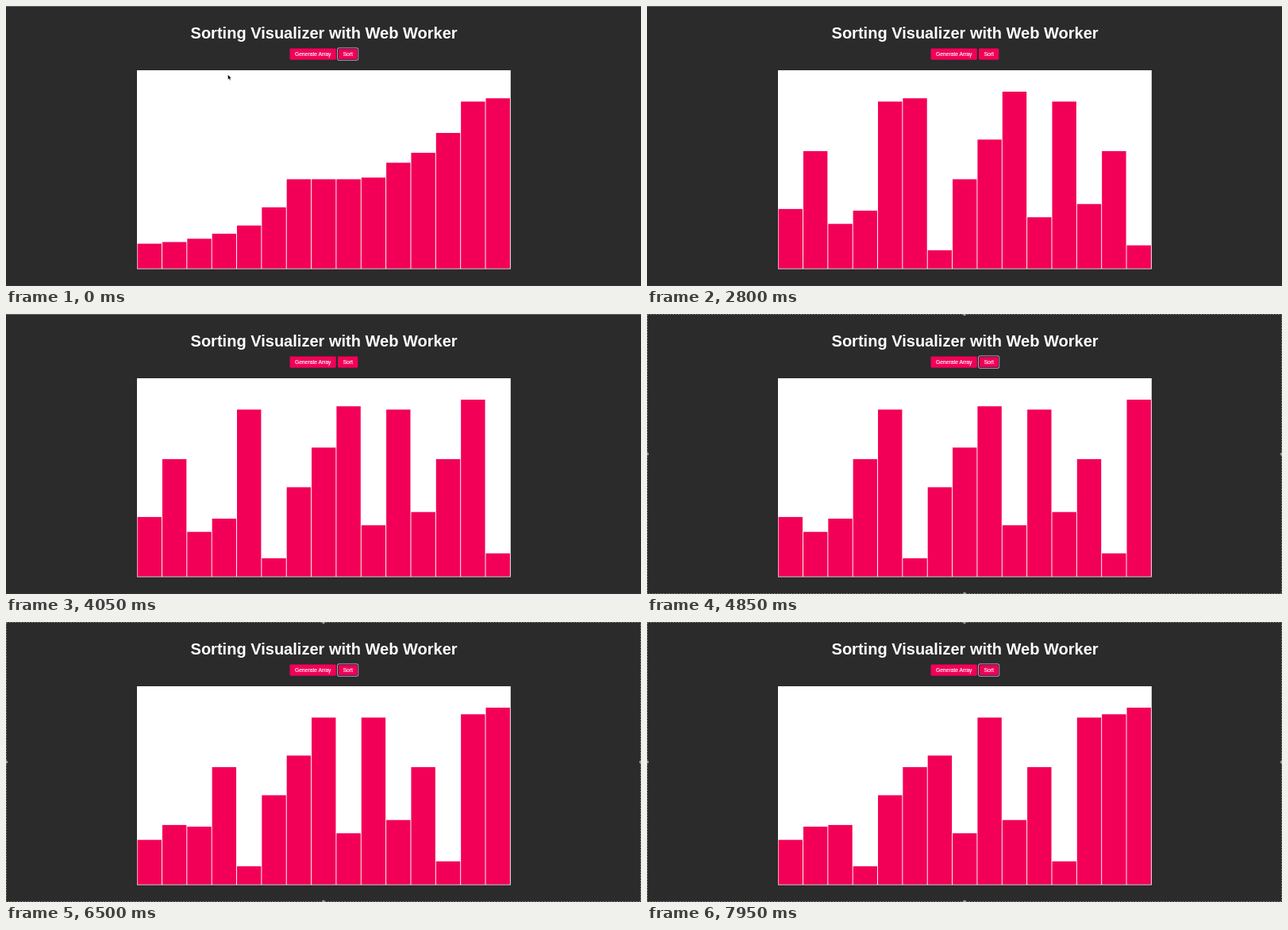
These frames come from a looping animation (800x353 px, 8000 ms). An HTML page:

```html
<!DOCTYPE html>
<html lang="en">
<head>
<meta charset="utf-8">
<title>Sorting Visualizer</title>
<style>
  html, body { margin: 0; width: 100%; height: 100%; overflow: hidden; background: #2b2b2b; }
  svg { display: block; width: 800px; height: 353px; }
  text { font-family: "Liberation Sans", Arial, sans-serif; fill: #fff; text-anchor: middle; }
  .title { font-size: 20.05px; font-weight: bold; }
  .label { font-size: 6.7px; stroke: #fff; stroke-width: 0.15; }
  .red { fill: #f20057; }
</style>
</head>
<body>
<svg viewBox="0 0 800 353">
  <rect width="800" height="353" fill="#2b2b2b"/>
  <g id="edge">
    <rect width="800" height="0.8" fill="#6c6c6c"/>
    <rect y="352.2" width="800" height="0.8" fill="#42303a"/>
  </g>
  <g id="frame" fill="none" stroke="#8c8c8c">
    <rect x="0.5" y="0.5" width="799" height="352" stroke-width="0.8" stroke-dasharray="2 1.5"/>
    <g fill="#9a9a9a" stroke="#c8c8c8" stroke-width="0.5">
      <circle cx="400" cy="0.3" r="1.6"/>
      <circle cx="400" cy="352.5" r="1.6"/>
      <circle cx="0.3" cy="176.5" r="1.6"/>
      <circle cx="799.7" cy="176.5" r="1.6"/>
    </g>
  </g>
  <text class="title" x="400.6" y="40.8">Sorting Visualizer with Web Worker</text>
  <rect class="red" x="357.5" y="53.5" width="58.3" height="14.2" rx="1.4"/>
  <text class="label" x="386.8" y="62.8">Generate Array</text>
  <rect class="red" x="418" y="53.5" width="25.3" height="14.2" rx="1.4"/>
  <text class="label" x="430.8" y="62.8">Sort</text>
  <g id="ring" fill="none" stroke-width="0.8">
    <rect x="417.6" y="53" width="26.1" height="15.2" rx="1.6" stroke="#eef0ff"/>
    <rect x="418.4" y="53.8" width="24.5" height="13.6" rx="1.2" stroke="#1c1a3c"/>
  </g>
  <rect x="165" y="81" width="470.8" height="250.6" fill="#fff"/>
  <g id="bars" class="red"></g>
  <path id="cursor" d="M0 0V6.4L1.5 5.1L2.5 7.4L3.6 6.9L2.6 4.7L4.5 4.6Z" fill="#000" stroke="#fff" stroke-width="0.4"/>
</svg>
<script>
const LOOP = 8000;
const GENERATE = 950, SORT = 2002, STEP = 204, REFOCUS = 4450, CURSOR_GONE = 2650;
const LEFT = 165.6, BOTTOM = 330.9, PITCH = 31.35, GAP = 0.95, UNIT = 250 / 120;

// The numbers being sorted; a bar is UNIT pixels tall per 1.
const before = [15, 16, 18, 21, 26, 37, 54, 54, 54, 55, 64, 70, 82, 101, 103];
const after = [36, 101, 71, 27, 35, 103, 11, 54, 78, 107, 31, 101, 39, 71, 14];

const home = [279.5, 86.5];
const moves = [
  { from: 0, until: 750, to: [388, 62] },
  { from: 950, until: 1200, to: [402.3, 94] },
  { from: 1755, until: 1950, to: [428, 61] },
  { from: 2050, until: 2600, to: [9, 150] }
];

const byId = id => document.getElementById(id);
const show = (id, on) => byId(id).setAttribute("visibility", on ? "visible" : "hidden");

function setAll(el, attrs) {
  for (const name in attrs) el.setAttribute(name, attrs[name]);
}

// Bubble sort, stopped after the given number of swaps.
function sortPartly(list, swaps) {
  const a = list.slice();
  for (let end = a.length - 1; end > 0; end--) {
    for (let i = 0; i < end; i++) {
      if (a[i] <= a[i + 1]) continue;
      if (swaps-- <= 0) return a;
      [a[i], a[i + 1]] = [a[i + 1], a[i]];
    }
  }
  return a;
}

const valuesAt = t => t < GENERATE ? before : sortPartly(after, Math.floor((t - SORT) / STEP));

// Each move is an arc: x eases in while y eases out.
function cursorAt(t) {
  let [x, y] = home;
  for (const { from, until, to } of moves) {
    const k = Math.min(1, Math.max(0, (t - from) / (until - from)));
    x += (to[0] - x) * k * k;
    y += (to[1] - y) * (1 - (1 - k) ** 2);
  }
  return [x, y];
}

const bars = before.map((_, i) => {
  const bar = document.createElementNS("http://www.w3.org/2000/svg", "rect");
  setAll(bar, { x: LEFT + PITCH * i, width: PITCH - GAP });
  byId("bars").append(bar);
  return bar;
});

function draw(t) {
  valuesAt(t).forEach((v, i) => setAll(bars[i], { y: BOTTOM - v * UNIT, height: v * UNIT }));
  show("ring", t < GENERATE || t >= REFOCUS);
  show("frame", t >= REFOCUS);
  show("edge", t < REFOCUS);
  show("cursor", t < CURSOR_GONE);
  byId("cursor").setAttribute("transform", `translate(${cursorAt(t)})`);
}

const start = performance.now();
function tick() {
  draw((performance.now() - start) % LOOP);
  requestAnimationFrame(tick);
}
tick();
</script>
</body>
</html>
```
